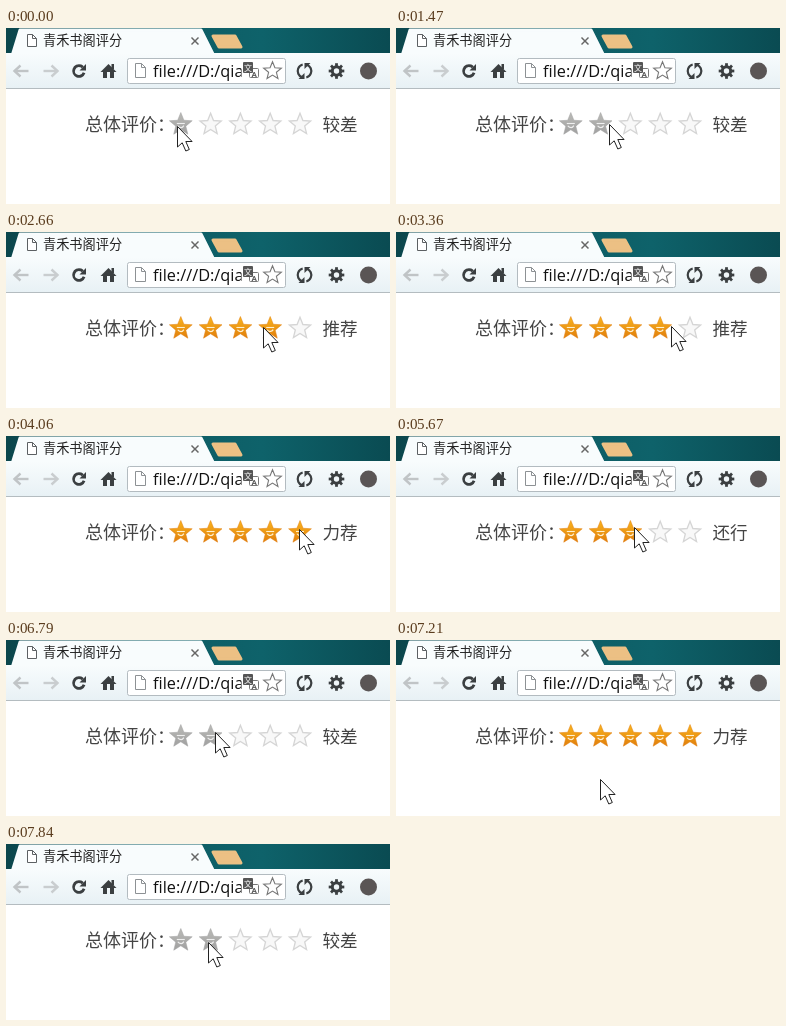
These frames come from a looping animation (384 by 176 pixels, 8000 ms). An HTML page with a canvas:

```html
<!DOCTYPE html>
<html lang="zh-CN">
<head>
<meta charset="utf-8">
<title>星级评分</title>
<style>
html, body { margin: 0; width: 100%; height: 100%; overflow: hidden; background: #fff; }
canvas { display: block; }
</style>
</head>
<body>
<canvas id="stage" width="384" height="176"></canvas>
<script>
const ctx = document.getElementById('stage').getContext('2d');
const LOOP = 8000, TICK = 70, PITCH = 29.8, FIRST = 174.8;
const CJK = '"Noto Sans CJK SC", "Noto Sans CJK", sans-serif';
const LABELS = ['较差', '较差', '还行', '推荐', '力荐'];
const CLICKS = [980, 2170, 3010, 3920, 3990];
const DARK = '#3b3f41';

const linear = p => p;
const slowDown = p => 1 - (1 - p) ** 1.4;
const speedUp = p => p ** 1.6;

// start time, ticks taken, pointer position reached, easing
const MOVES = [
  [0, 1, 171, 98], [420, 5, 205, 96], [1400, 6, 229, 96],
  [2520, 5, 268, 94, slowDown], [3290, 7, 293, 93],
  [4620, 7, 258, 91], [5460, 4, 238, 91], [6160, 5, 209, 90],
  [6790, 7, 204, 139, speedUp], [7490, 6, 202, 98]
];

function pointerAt(t) {
  let [, , x, y] = MOVES[0];
  for (const [start, ticks, toX, toY, ease = linear] of MOVES) {
    if (t < start) break;
    const p = ease(Math.min(1, (Math.floor((t - start) / TICK) + 1) / ticks));
    x += (toX - x) * p;
    y += (toY - y) * p;
  }
  return [x, y];
}

// Away from the row, the clicked rating of five returns.
function ratingAt(x, y) {
  return y > 109 ? 5 : Math.floor((x - FIRST) / PITCH + 0.5) + 1;
}

function paint(fill, line, width = 1) {
  if (fill) { ctx.fillStyle = fill; ctx.fill(); }
  if (line) { ctx.strokeStyle = line; ctx.lineWidth = width; ctx.stroke(); }
}

function poly(points, fill, line, width) {
  ctx.beginPath();
  for (const [x, y] of points) ctx.lineTo(x, y);
  ctx.closePath();
  paint(fill, line, width);
}

function stroke(points, color, width) {
  ctx.beginPath();
  for (const [x, y] of points) ctx.lineTo(x, y);
  paint(null, color, width);
}

function arc(x, y, r, line, width, from = 0, to = 2 * Math.PI) {
  ctx.beginPath();
  ctx.arc(x, y, r, from, to);
  paint(null, line, width);
}

function box(x, y, w, h, r, fill, line) {
  ctx.beginPath();
  ctx.roundRect(x, y, w, h, r);
  paint(fill, line);
}

// Four-sided shape whose sides lean right by different amounts.
function slab(x, y, w, h, left, right, fill, line) {
  ctx.lineJoin = 'round';
  poly([[x, y], [x + w, y], [x + w + right, y + h], [x + left, y + h]], fill, line, 3);
  ctx.lineJoin = 'miter';
}

function text(s, x, y, font, color) {
  ctx.font = font;
  ctx.fillStyle = color;
  ctx.fillText(s, x, y);
}

function blend(x0, y0, x1, y1, ...colors) {
  const g = ctx.createLinearGradient(x0, y0, x1, y1);
  colors.forEach((c, i) => g.addColorStop(i / (colors.length - 1), c));
  return g;
}

function star(x, y, r, fill, line, width) {
  const points = Array.from({ length: 10 }, (_, i) => {
    const a = (i / 5 - 0.5) * Math.PI, d = i % 2 ? r * 0.44 : r;
    return [x + d * Math.cos(a), y + d * Math.sin(a)];
  });
  poly(points, fill, line, width);
}

function pageIcon(x, y, w, h, color) {
  const fold = w - 4;
  poly([[x, y], [x + fold, y], [x + w, y + 4], [x + w, y + h], [x, y + h]], '#fff', color);
  stroke([[x + fold, y], [x + fold, y + 4], [x + w, y + 4]], color);
}

function navArrow(x, dir, color) {
  const tip = x + 7 * dir;
  stroke([[x - 7 * dir, 43], [tip, 43]], color, 2.4);
  stroke([[tip - 6 * dir, 37.5], [tip, 43], [tip - 6 * dir, 48.5]], color, 2.4);
}

function drawTabs() {
  ctx.fillStyle = blend(0, 0, 384, 0, '#0b464c', '#0d5a62', '#0e626a', '#0a4b52');
  ctx.fillRect(0, 0, 384, 26);
  slab(14, 2, 181, 26, -8, 13, '#f8fcfd', '#f8fcfd');
  slab(207, 8, 22, 11, 6, 6, '#ecc084', '#ecc084');
  pageIcon(21.5, 6.5, 9, 12, '#5c6063');
  text('青禾书阁评分', 37, 16.7, '13.2px ' + CJK, '#222');
  for (const d of [-3.5, 3.5]) stroke([[189 - d, 9.5], [189 + d, 16.5]], '#666', 1.5);
}

function drawAddress() {
  box(121.5, 30.5, 158, 25, 2, '#fff', '#b3bbc0');
  pageIcon(129.5, 35.5, 10, 14, '#8d9194');
  ctx.save();
  ctx.beginPath();
  ctx.rect(145, 31, 90.5, 24);
  ctx.clip();
  text('file:///D:/qianduan', 147, 49, '16.3px "Open Sans", sans-serif', '#111');
  ctx.restore();
  box(243.5, 40.5, 9, 9, 1, '#fff', '#777');
  box(237, 34, 10, 11, 1, '#555');
  text('文', 238, 42.8, '8px ' + CJK, '#fff');
  text('A', 245.5, 48.8, 'bold 8px Roboto, sans-serif', '#555');
  star(266.5, 43, 9.3, '#fff', '#777', 1.1);
}

function drawReload(x, y) {
  arc(x, y, 5.4, DARK, 2.8, 0.35, 5.5);
  poly([[x + 7, y - 7], [x + 7, y - 0.5], [x + 0.5, y - 0.5]], DARK);
}

function drawHome(x, y) {
  poly([[x - 8, y + 1], [x, y - 7], [x + 8, y + 1]], DARK);
  ctx.fillRect(x + 3, y - 7, 2.5, 5);
  for (const side of [-5.5, 1.5]) ctx.fillRect(x + side, y, 4, 7);
}

function drawCycle(x, y) {
  for (const turn of [0, Math.PI]) {
    ctx.save();
    ctx.translate(x, y);
    ctx.rotate(turn);
    arc(0, 0, 6.8, DARK, 2.2, -1.2, 1.3);
    poly([[0, -8], [0, -2], [6, -8]], DARK);
    ctx.restore();
  }
}

function drawGear(x, y) {
  for (let i = 0; i < 8; i++) {
    const a = i * Math.PI / 4, c = Math.cos(a), s = Math.sin(a);
    stroke([[x + 4 * c, y + 4 * s], [x + 7.8 * c, y + 7.8 * s]], DARK, 2.8);
  }
  arc(x, y, 4.2, DARK, 3);
}

function drawBrowser() {
  drawTabs();
  ctx.fillStyle = blend(0, 25, 0, 60, '#f8fcfd', '#e8f1f5');
  ctx.fillRect(0, 25, 384, 35);
  ctx.fillStyle = '#b4bcc0';
  ctx.fillRect(0, 60, 384, 1);
  navArrow(15.5, -1, '#c0c4c6');
  navArrow(44.5, 1, '#c9cdcf');
  drawReload(73, 43);
  drawHome(102.5, 43);
  drawAddress();
  drawCycle(298.5, 43);
  drawGear(330.5, 43);
  box(354, 34.5, 17, 17, 8.5, '#5a5555');
}

function drawRating(i, rating) {
  const x = FIRST + i * PITCH, y = 96.5;
  if (i >= rating) {
    star(x, y, 11.2, '#f8f8f8', '#d5d5d5', 1.3);
    return;
  }
  const [top, low, mark] = rating > 2
    ? ['#f7b01c', '#e07d0c', '#fff0d0']
    : ['#b8b8b5', '#a0a0a0', '#efefef'];
  star(x, y, 12, blend(0, y - 10, 0, y + 10, top, low), low, 0.5);
  stroke([[x - 4, y - 1], [x + 4, y - 1]], mark, 1.1);
  arc(x, y - 0.5, 3.4, mark, 1.2, 0.5, 2.6);
}

function drawPointer(x, y) {
  const shape = [[0, 0], [0, 20.5], [4.7, 16.3], [8.3, 24.5], [11.8, 23], [8.3, 15], [14.6, 15]];
  ctx.save();
  ctx.translate(Math.round(x) + 0.5, Math.round(y) + 0.5);
  poly(shape, '#fff', '#222');
  ctx.restore();
}

function draw(t) {
  const [x, y] = pointerAt(t), rating = ratingAt(x, y);
  ctx.fillStyle = '#fff';
  ctx.fillRect(0, 0, 384, 176);
  drawBrowser();
  text('总体评价：', 79, 102.7, '300 18px ' + CJK, '#444');
  LABELS.forEach((_, i) => drawRating(i, rating));
  text(LABELS[rating - 1], 316.5, 102.7, '300 17.6px ' + CJK, '#444');
  if (CLICKS.some(c => t >= c && t < c + TICK)) {
    arc(x - 4.5, y - 4.8, 11.8, '#222');
    arc(x - 4.5, y - 4.8, 10.8, '#fff');
  }
  drawPointer(x, y);
}

let began;
function frame(now) {
  began ??= now;
  draw((now - began) % LOOP);
  requestAnimationFrame(frame);
}
requestAnimationFrame(frame);
</script>
</body>
</html>
```
